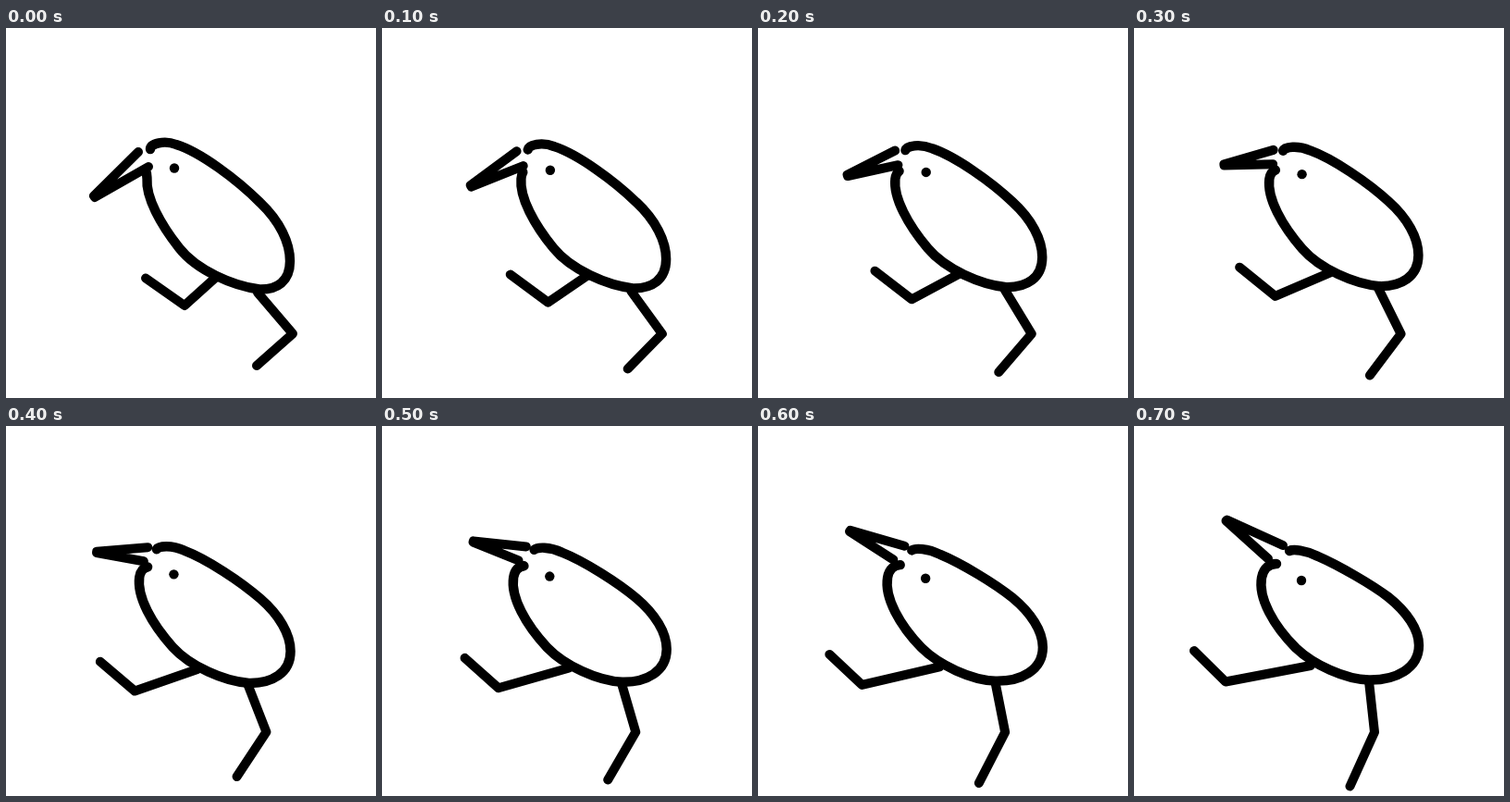
An HTML page for the animation above (800 ms loop, 400 by 400 pixels).

```html
<!DOCTYPE html>
<html lang="en">
<head>
<meta charset="utf-8">
<title>Walking bird</title>
<style>
  html, body { margin: 0; width: 100%; height: 100%; overflow: hidden; background: #fff; }
  svg { display: block; width: 100%; height: 100%; }
  path { fill: none; stroke: #000; stroke-width: 10; stroke-linecap: round; stroke-linejoin: round; }
  #body, #eye { stroke-width: 10.4; }
</style>
</head>
<body>
<svg viewBox="0 0 400 400"></svg>
<script>
  // Each part: its outline at the start and at the end of the stride.
  const parts = {
    body: [
      'M156 131 C156 125 171 121 184 126 C210 134 250 164 275 189 C296 209 307 232 307 252 ' +
      'C307 274 293 283 274 282.5 C246 279 206 262 187 237.5 C167 212 151 183 152.5 163 C152.5 161 152 159 152 157',
      'M168 135 C172 133 185 134 199 141 C222 151 258 172 275 185 C295 201 308 220 308 237 ' +
      'C308 262 283 275 254 274.5 C228 274 194 258 175 240 C151 216 134 186 138 164 C140 153 147 149 154 149'
    ],
    beak: [
      'M143 134 L95 181.5 L96 183 L154 150',
      'M161 129 L100.5 101.5 L99.5 102.5 L145 143.5'
    ],
    eye: ['M182 151.5 L182.01 151.5', 'M181 167 L181.01 167'],
    frontLeg: ['M228 268.5 L193 300 L151 270.5', 'M191 259 L99 276.5 L65 243'],
    backLeg: ['M272 286 L310 330.5 L271 365', 'M254 276 L260 331 L233.5 389.5']
  };

  const svg = document.querySelector('svg');
  const timing = { duration: 800, iterations: Infinity, easing: 'steps(8, jump-none)' };

  for (const [name, [from, to]] of Object.entries(parts)) {
    const path = document.createElementNS('http://www.w3.org/2000/svg', 'path');
    path.id = name;
    path.setAttribute('d', from);
    svg.append(path);
    path.animate({ d: [from, to].map(d => `path("${d}")`) }, timing);
  }
</script>
</body>
</html>
```
